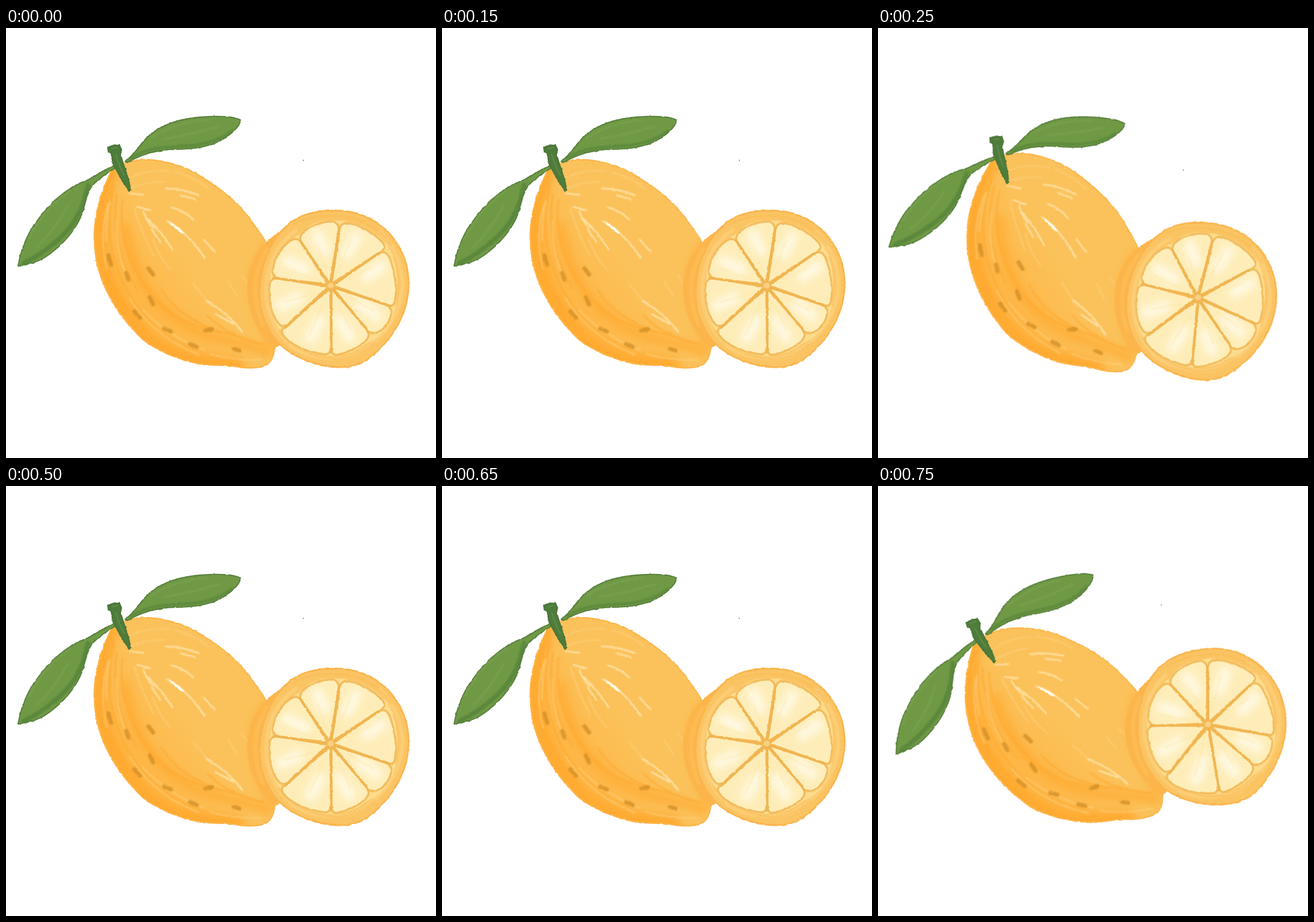
Animation of 748x748 px, one loop 1 s. Source, as an HTML page without scripts:

```html
<!DOCTYPE html>
<html lang="en">
<head>
<meta charset="utf-8">
<title>Rocking lemon</title>
<style>
html, body { margin: 0; width: 100%; height: 100%; overflow: hidden; background: #fff; }
svg { display: block; width: 100vw; height: 100vh; }
path { stroke-linecap: round; stroke-linejoin: round; }
.rock { transform-origin: 353px 379px; animation: rock 1s step-end infinite; }
@keyframes rock {
  0%, 50%, 100% { transform: none; }
  25% { transform: rotate(5.7deg); }
  75% { transform: translate(1px, .7px) rotate(-9deg); }
}
.line { fill: none; }
.shine { stroke: #fff0c8; stroke-width: 2.6; opacity: .75; }
.soft { stroke: #fdd383; stroke-width: 3; opacity: .5; }
.peel { stroke: #ffaa31; }
.spots { stroke: #d38f27; stroke-width: 7; opacity: .8; }
.pulp { fill: #feedb8; stroke: #f3bd5e; stroke-width: 3.6; }
.leaf { fill: #6f9944; stroke: #587f3d; stroke-width: 2; }
.vein { stroke: #4f7d38; }
</style>
</head>
<body>
<svg viewBox="0 0 748 748">
  <defs>
    <linearGradient id="skin" gradientUnits="userSpaceOnUse" x1="175" y1="470" x2="300" y2="380">
      <stop offset="0" stop-color="#ffb33f"/>
      <stop offset="1" stop-color="#fbc25b"/>
    </linearGradient>
    <filter id="rough" x="-5%" y="-5%" width="110%" height="110%" color-interpolation-filters="sRGB">
      <feTurbulence type="fractalNoise" baseFrequency=".15" numOctaves="2" seed="4"/>
      <feDisplacementMap in="SourceGraphic" scale="3" xChannelSelector="R" yChannelSelector="G"/>
    </filter>
    <filter id="blur" x="-20%" y="-20%" width="140%" height="140%" color-interpolation-filters="sRGB"><feGaussianBlur stdDeviation="7"/></filter>
    <filter id="haze" x="-20%" y="-20%" width="140%" height="140%" color-interpolation-filters="sRGB"><feGaussianBlur stdDeviation="1"/></filter>
    <path id="body" d="M183 247C200 234 220 228 248 228C282 230 318 242 345 261C387 286 416 316 434 344C445 360 455 371 458 387L476 470L468 552C468 566 466 577 455 586C444 593 420 594 401 590C382 586 360 589 335 585C298 577 263 562 238 543C205 512 184 480 170 448C156 417 151 380 153 349C156 310 169 276 183 247Z"/>
    <clipPath id="inBody"><use href="#body"/></clipPath>
  </defs>

  <g class="rock">
    <g filter="url(#rough)">
      <!-- whole fruit -->
      <use href="#body" fill="url(#skin)"/>
      <g clip-path="url(#inBody)">
        <g class="line peel" filter="url(#blur)">
          <path stroke-width="28" d="M182 250C140 350 162 440 215 510S340 582 400 588"/>
          <path stroke-width="14" opacity=".8" d="M208 345C220 430 258 488 318 520S410 542 455 565"/>
          <path stroke-width="13" opacity=".8" d="M455 380C420 420 426 480 462 550"/>
        </g>
        <g class="line peel" stroke-width="3" opacity=".7" filter="url(#haze)">
          <path d="M187 275C172 340 180 400 210 455S270 535 325 560"/>
          <path d="M193 290C184 345 198 408 228 455"/>
          <path d="M203 300C194 360 218 420 252 462S315 515 375 530"/>
          <path d="M165 370C172 435 205 485 245 526"/>
          <path d="M270 455C300 502 350 525 410 538"/>
          <path d="M350 500C380 530 415 543 448 550"/>
        </g>
        <g class="line soft" filter="url(#haze)">
          <path d="M178 305Q160 370 176 420M193 335Q190 390 214 440M181 300Q174 335 174 370"/>
          <path d="M215 470Q255 535 335 568M238 490Q280 535 345 560M355 567Q400 580 445 577"/>
          <path d="M213 262Q240 246 285 249M219 278Q250 266 276 268M295 251Q330 260 352 280"/>
          <path d="M223 314Q235 355 257 396M255 367Q265 397 286 420M326 445L358 485M386 440L402 466M410 430L419 443"/>
        </g>
        <g class="line shine" filter="url(#haze)">
          <path d="M215 288L239 290M278 279Q305 279 336 291M303 291L329 298M228 311L251 317"/>
          <path d="M288 312Q308 317 326 333M239 319Q245 339 257 348M245 331Q268 352 290 385M253 350L269 373"/>
          <path d="M280 336Q302 346 322 370M325 372L346 400M344 368L363 389M350 475Q388 498 411 529M365 498L395 514"/>
        </g>
        <path fill="#fffaea" d="M283 337Q301 344 311 359Q299 355 283 337Z"/>
        <path class="line spots" filter="url(#haze)" d="M178 395L183 412M209 426L213 438M248 418L256 429M250 469L256 481M223 493L233 504M275 523L287 528M320 550L332 555M347 526L358 524M396 558L406 561"/>
        <use href="#body" fill="none" stroke="#fdb44a" stroke-width="4"/>
      </g>

      <!-- cut half -->
      <path fill="#fcb54a" d="M500 340C454 362 424 396 420 442C417 488 434 529 468 556L500 545Z"/>
      <path class="line" stroke="#fdc15a" stroke-width="7" opacity=".6" filter="url(#haze)" d="M455 385C426 425 430 480 447 517"/>
      <path fill="#fbc463" stroke="#fbb54e" stroke-width="3" d="M562 318C605 315 643 330 669 360C692 387 702 418 700 452C698 496 676 535 642 566C624 583 603 591 578 590C542 589 503 575 476 550C448 521 438 482 442 445C446 403 463 363 497 337C517 323 538 319 562 318Z"/>
      <path class="line" stroke="#fdd27e" stroke-width="7" opacity=".7" filter="url(#haze)" d="M505 352C465 380 446 430 455 480C461 513 477 538 503 558C535 575 575 579 605 570C650 547 684 505 689 454C691 415 675 378 651 355"/>
      <path class="line" stroke="#f9bb55" stroke-width="3" opacity=".7" filter="url(#haze)" d="M500 342C520 330 540 327 568 327C610 326 645 343 670 377M475 526C500 558 535 572 574 576C600 576 621 566 641 548"/>
      <g transform="translate(565 449) scale(1.02) translate(-565 -449)">
        <path fill="#fcdb8c" d="M550 338C600 332 642 351 663 381C680 410 681 447 675 487C668 516 652 536 627 546C605 564 582 569 557 568C523 565 495 552 481 527C461 506 455 465 462 433C464 402 484 376 511 361Q525 344 550 338Z"/>
        <g class="pulp">
          <path d="M563 446L516 378C509 367 514 357 527 350Q548 338 568 339Q579 340 579 354Z"/>
          <path d="M566 445L580 354C581 341 590 339 608 345Q635 354 653 374C660 383 655 389 646 393Z"/>
          <path d="M568 448L645 394Q659 385 666 403Q679 438 675 471C673 486 667 484 656 479Z"/>
          <path d="M568 451L653 478C668 483 671 490 666 504Q659 522 644 528C633 532 628 527 621 519Z"/>
          <path d="M566 453L624 519C634 531 630 540 615 550Q594 563 577 566C566 568 566 559 566 547Z"/>
          <path d="M564 453L566 551C566 565 559 567 545 564Q511 558 489 539C477 528 481 521 492 514Z"/>
          <path d="M561 450L494 512C483 522 477 516 470 504Q459 483 460 454C460 437 467 434 481 437Z"/>
          <path d="M560 446L482 437C466 435 463 428 468 412Q475 388 493 374C506 364 512 369 520 382Z"/>
        </g>
        <path class="line" stroke="#fffbea" stroke-width="20" opacity=".85" filter="url(#blur)" d="M542 362L554 388M608 366L592 394M651 416L626 433M642 500L616 480M597 536L582 508M530 537L546 508M481 482L510 469M492 407L521 421"/>
        <path class="line" stroke="#fde6a4" stroke-width="2.5" opacity=".5" filter="url(#haze)" d="M559 429L543 382M575 427L599 370M592 438L638 416M598 468L638 491M578 477L597 521M552 479L529 532M538 462L486 476M535 436L487 419"/>
        <path class="line" stroke="#f1b550" stroke-width="4.2" d="M565 449L579 351M565 449L648 392M565 449L666 483M565 449L629 526M565 449L566 562M565 449L487 520M565 449L468 435M565 449L513 372"/>
        <circle cx="565" cy="448" r="5" fill="#f8d082"/>
      </g>

      <!-- leaves and stem -->
      <path class="leaf" d="M207 232C226 219 232 202 247 189C275 163 315 155 354 154C378 153 399 155 408 160C407 171 394 183 377 194C354 207 325 211 297 211C265 211 237 219 211 234Z"/>
      <path class="line vein" stroke-width="5" opacity=".5" filter="url(#haze)" d="M218 226C247 207 280 207 318 205Q365 201 393 179"/>
      <path class="line" stroke="#82a75a" stroke-width="4" opacity=".4" filter="url(#haze)" d="M252 191Q293 164 350 160M275 193Q325 185 370 171"/>
      <path class="leaf" d="M189 239C171 246 160 255 141 265C108 276 78 303 55 334C34 361 25 391 21 414C39 411 58 407 75 394C99 376 118 354 129 331C138 312 137 291 151 273Q167 257 190 244Z"/>
      <path class="line vein" stroke-width="8" opacity=".6" filter="url(#haze)" d="M143 274C135 306 128 328 108 351Q76 386 31 409"/>
      <path class="line" stroke="#82a75a" stroke-width="4" opacity=".4" filter="url(#haze)" d="M112 283Q68 310 40 365M107 309Q87 349 55 380"/>
      <path fill="#4e7c3a" stroke="#4a7538" stroke-width="2" d="M177 208Q187 203 197 203L201 212L199 219C205 241 214 262 217 281L214 284C205 271 194 251 186 236L183 218L178 215Z"/>
      <path class="line" stroke="#739458" stroke-width="2" opacity=".6" d="M184 210L193 208M191 220Q197 242 206 257"/>
    </g>
    <rect x="516.5" y="229.5" width="1.4" height="1.4" fill="#333"/>
  </g>
</svg>
</body>
</html>
```
